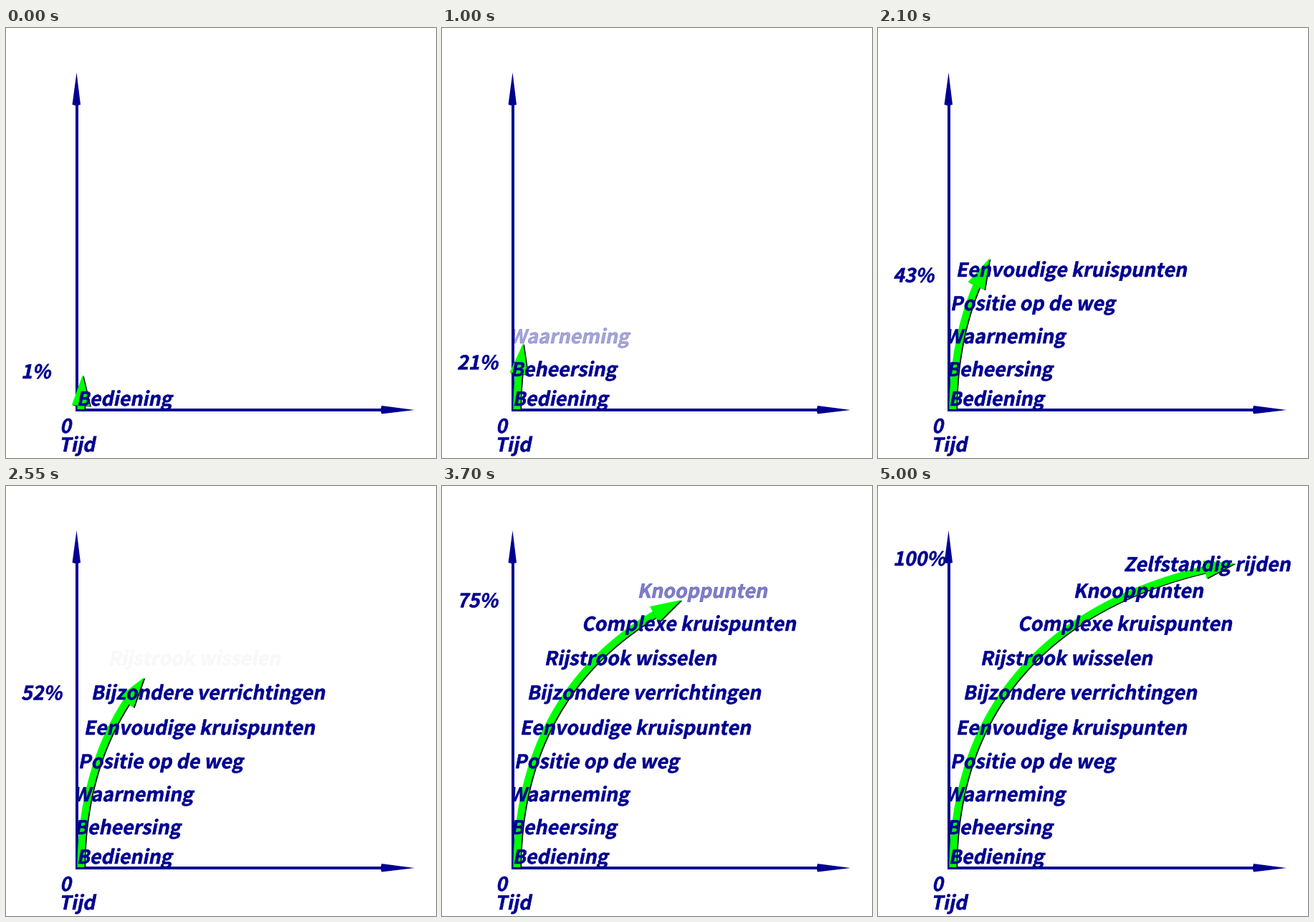
These frames come from a looping animation (600x600 px, 10 s). A matplotlib script:

```python
import numpy as np
import matplotlib.pyplot as plt
from matplotlib.animation import FuncAnimation
from matplotlib.patches import PathPatch, Polygon
from matplotlib.path import Path
from matplotlib.textpath import TextPath

SIZE, STEP, FRAMES, GROWTH = 600, 50, 200, 100
NAVY, GREEN = "#000090", "#00ff00"
FONT = {"family": "Noto Sans CJK JP", "weight": "bold"}
FONT_SIZE, SLANT, FADE = 26.7, 0.2, 200
HEAD_LENGTH, HEAD_HALF, BODY_HALF = 43, 12.8, 5

# text, left edge, baseline, moment the fade-in starts (ms)
SKILLS = [
    ("Bediening", 101, 527, -FADE),
    ("Beheersing", 98, 486, 450),
    ("Waarneming", 98, 440, 930),
    ("Positie op de weg", 103, 394, 1350),
    ("Eenvoudige kruispunten", 111, 347, 1800),
    ("Bijzondere verrichtingen", 121, 298, 2200),
    ("Rijstrook wisselen", 145, 250, 2545),
    ("Complexe kruispunten", 197, 202, 3000),
    ("Knooppunten", 275, 156, 3600),
    ("Zelfstandig rijden", 344, 119, 4230),
]


def bezier(p0, p1, p2, p3, n=600):
    t = np.linspace(0, 1, n)[:, None]
    p0, p1, p2, p3 = map(np.array, (p0, p1, p2, p3))
    return ((1 - t) ** 3 * p0 + 3 * t * (1 - t) ** 2 * p1
            + 3 * t * t * (1 - t) * p2 + t ** 3 * p3)


SPINE = bezier((104.5, 532), (106, 292), (258, 150), (498, 108))
ARC = np.append(0, np.cumsum(np.hypot(*np.diff(SPINE, axis=0).T)))


def tip_length(u):
    """Arc length reached by the tip: slow start, then nearly steady."""
    ease = u * u * (2.12 - 1.12 * u)
    return 48 + (ARC[-1] - 48) * ease


def label_y(u):
    """Baseline of the percentage: rests, climbs, then settles."""
    v = max(0, u - 0.17) / 0.83
    return 489 - 378 * v * (1 + (1 - v) * (1.25 * v - 0.12))


def at_length(s):
    return np.array([np.interp(s, ARC, SPINE[:, k]) for k in (0, 1)])


def arrow(u):
    """Body and head outlines of the growing arrow."""
    s = tip_length(u)
    tip = at_length(s)
    line = np.array([at_length(d) for d in np.linspace(0, s - HEAD_LENGTH, 120)])
    along = np.gradient(line, axis=0)
    along /= np.hypot(*along.T)[:, None]
    side = BODY_HALF * np.column_stack([-along[:, 1], along[:, 0]])
    body = np.vstack([line + side, (line - side)[::-1]])
    base = line[-1]
    dx, dy = (tip - base) / np.hypot(*(tip - base))
    wing = HEAD_HALF * np.array([-dy, dx])
    return body, np.array([tip, base + wing, base - wing])


def lettering(text, x, y, flush=True):
    """Slanted outline of text; flush puts the ink itself at x."""
    p = TextPath((0, 0), text, size=FONT_SIZE, prop=FONT)
    v = p.vertices.copy()
    v[:, 0] += SLANT * v[:, 1]
    if flush:
        v[:, 0] -= v[p.codes != Path.CLOSEPOLY, 0].min()
    return Path(np.column_stack([x + v[:, 0], y - v[:, 1]]), p.codes)


def write(text, x, y):
    return ax.add_patch(PathPatch(lettering(text, x, y), fc=NAVY, ec=NAVY,
                                  lw=0.4, zorder=4))


def shape(points, color, z):
    return ax.add_patch(Polygon(points, closed=True, fc=color, lw=0, zorder=z))


fig = plt.figure(figsize=(SIZE / 100, SIZE / 100), dpi=100, facecolor="white")
ax = fig.add_axes([0, 0, 1, 1])
ax.set_xlim(0, SIZE)
ax.set_ylim(SIZE, 0)
ax.axis("off")

shape([(96.5, 100), (100.5, 100), (100.5, 535), (96.5, 535)], NAVY, 1)
shape([(96.5, 531), (530, 531), (530, 535), (96.5, 535)], NAVY, 1)
shape([(98.5, 62), (104, 107), (98.5, 108.5), (92.5, 107)], NAVY, 1)
shape([(570, 533), (524, 538.5), (522.5, 533), (524, 527)], NAVY, 1)
write("0", 77, 565)
write("Tijd", 78, 591)

blank = np.zeros((3, 2))
shadows = [shape(blank, "black", 2) for _ in range(2)]
greens = [shape(blank, GREEN, 3) for _ in range(2)]
skills = [(write(text, x, y), start) for text, x, y, start in SKILLS]
label = write("1%", 22, 489)


def draw(i):
    n = min(i, GROWTH)
    u = n / GROWTH
    for shadow, green, pts in zip(shadows, greens, arrow(u)):
        green.set_xy(pts)
        shadow.set_xy(pts + (1.6, 0.8))
    for patch, start in skills:
        patch.set_alpha(float(np.clip((n * STEP - start) / FADE, 0, 1)))
    label.set_path(lettering(f"{min(n + 1, 100)}%", 21, label_y(u), False))
    return [*shadows, *greens, *(p for p, _ in skills), label]


anim = FuncAnimation(fig, draw, frames=FRAMES, interval=STEP, repeat=True,
                     repeat_delay=0, init_func=lambda: draw(0), blit=False)
plt.show()
```
